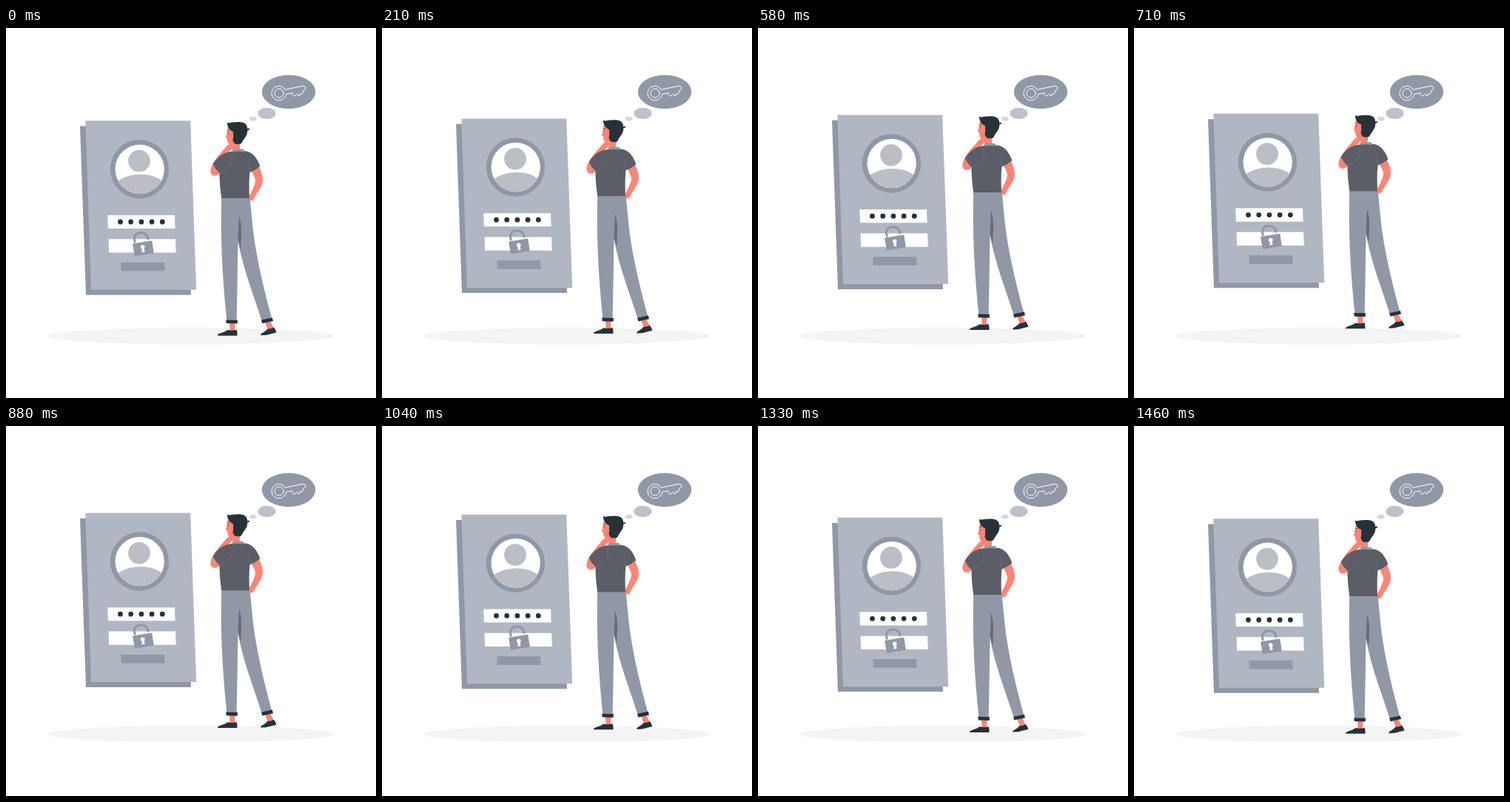
Recreate the animation shown at these times as an HTML page. Size 500 by 500 pixels, loop 1.5 s.

```html
<!DOCTYPE html>
<html lang="en">
<head>
<meta charset="utf-8">
<title>Forgotten password</title>
<style>
  html, body { margin: 0; width: 100%; height: 100%; overflow: hidden; background: #fff; }
  svg { display: block; width: 100%; height: 100%; }
  .mid { fill: #9098a6; }
  .light { fill: #b1b7c2; }
  .ink { fill: #263238; }
  .shirt { fill: #5b5e66; }
  .skin { fill: #ff8575; }
  .white { fill: #fff; }
  .line { fill: none; stroke: #fff; stroke-linejoin: round; }
</style>
</head>
<body>
<svg viewBox="0 0 500 500">
  <ellipse cx="249.7" cy="416.2" rx="193.7" ry="11.4" fill="#f4f4f4"/>

  <g id="bubble">
    <ellipse class="mid" cx="382" cy="86.3" rx="36.2" ry="22.9"/>
    <ellipse cx="352.5" cy="115.3" rx="12" ry="7.6" fill="#bcc1ca"/>
    <ellipse cx="333.7" cy="122.7" rx="5" ry="3" fill="#d6d9de"/>
    <g class="line">
      <circle cx="369" cy="88" r="6"/>
      <path d="M377.2 83.3L400.5 78.4Q404.6 78 405 81Q405 83.6 402 84.3L400.6 88.6Q399.4 90.4 397.8 88.2L395.8 92L393.6 89.4L391.6 90.2L389.6 92.6L387.2 90L386.8 87.6L378.4 89.4A9.7 9.7 0 1 1 377.2 83.3Z"/>
    </g>
  </g>

  <g id="floating">
    <g id="panel">
      <path class="mid" d="M100 132.6H242L250 360.7H108Z"/>
      <path class="light" d="M107.4 125.3H249.2L257.2 353.8H115Z"/>
      <circle class="mid" cx="180.5" cy="190.8" r="39.7"/>
      <circle class="white" cx="180.7" cy="190.8" r="33.2"/>
      <circle cx="180" cy="179.6" r="14.9" fill="#bbbfc5"/>
      <path d="M151.6 206.6C168 195 196 195 210.2 206.2A33.2 33.2 0 0 1 151.6 206.6Z" fill="#bbbfc5"/>
      <path class="white" d="M137.3 253H228L228.6 271.1H137.9ZM138.5 285.3H229.1L229.7 303.5H139.1Z"/>
      <path d="M154.5 262H212" fill="none" stroke="#263238" stroke-width="6.8" stroke-linecap="round" stroke-dasharray="0 14.2"/>
      <path class="mid" d="M155.2 316.7H214.2L214.6 328.5H155.6Z"/>
      <path d="M174.6 290C170.8 280.5 177 276.6 182 276.6C188 276.4 192.2 280.5 192 286" fill="none" stroke="#9098a6" stroke-width="3"/>
      <path class="mid" d="M172 291.3L196.2 287.4Q197.2 287.3 197.4 288.2L199.7 303.2Q199.8 304.2 198.8 304.4L175 308.3Q174 308.4 173.8 307.4L171.2 292.4Q171.1 291.5 172 291.3Z"/>
      <circle class="white" cx="184.7" cy="296" r="2.8"/>
      <path class="white" d="M184 296H186L187.6 302.4L183.4 303.2Z"/>
    </g>

    <g id="man">
      <path class="skin" d="M302 398H309.6L309 409H302.6ZM350 397L356.8 395.5L361.5 405L354 408Z"/>
      <path class="ink" d="M286 415.7C285.6 412.2 293.5 412.8 299.5 408Q305 409.6 311.6 407.8Q313 411.6 312.4 415.7ZM344.2 415.2C344 411.8 350.5 411.6 353.2 406.8Q358 406.8 361.8 404.6Q364.6 407.8 365.4 411.5L351.5 415Z"/>
      <path class="mid" d="M291.2 229H329.4C331.6 246 332.6 266 336.2 290C341.4 324 350.5 360 359 391.8L345.4 395C335.5 363 320 325 313.6 288C312.6 330 312.6 362 311.6 396H298.4C293 344 289.4 288 291.2 229Z"/>
      <path d="M315 254C319.6 268 318 284 317 299Q314.4 290 313.5 285Z" fill="#686d79"/>
      <path class="ink" d="M297.2 394.4L313 394.8L312.6 399.6L297.8 399.1ZM345 394.6L359.8 391.4L361 396L346.4 399.2Z"/>

      <path class="skin" d="M331 188L341.6 187C345 194 348 202 346.6 209C344.4 217 338.5 223 335.4 230.5Q333 233.8 329 233.4V227C332 220 336.6 212 337 207C336.6 201 333 196 331 192Z"/>
      <path class="skin" d="M276.4 194C276 184 290 169 297.5 160.5C301 156.5 306.5 156.5 306.4 161C305 164.5 301.5 166 299 170C294 177 289.5 183 288 188V197C283 201.5 277 200 276.4 194Z"/>
      <path class="shirt" d="M298 168.2Q310 165 323 166.2C334 167.4 340 177 343.4 187Q337 192.6 329.4 195.2C328.2 207 328.6 218 329 230H291.2C289.6 219 288.6 208 288.4 196Q282.8 191 279.6 183.8Q287 171.6 298 168.2Z"/>
      <path d="M288.4 196Q303 191.5 305.4 180Q306 175 304.6 171M329.4 195.2L328.2 180" fill="none" stroke="#747780" stroke-width=".6"/>
      <path class="skin" d="M299.6 134C298.6 139 298.8 143 296.8 148L299 149.4C299 155 300.6 158.4 305.6 157.6L306.2 165L315.4 165L317 154L312 134Z"/>
      <path class="mid" d="M305.8 164.2Q313 162.6 321.2 164L321.4 167.4Q313 166 305.6 167.4Z"/>
      <path class="skin" d="M295 164Q298 158.6 303 155.8Q307 156.6 306.2 160.5L299.5 168Z"/>
      <path class="ink" d="M299 127.4Q302 129 305 127.6C311 127 318 126.6 322 128.6Q326 131 326.2 136L329.6 135.4Q329 138 326.2 138.4C326.6 146 321 149 318 156Q314 158 309.6 156.4C306.6 154 305.8 150 306.8 146L307.2 140C302.4 138.6 298.6 133 299 127.4Z"/>
      <path class="skin" d="M307.4 144.5C303.8 143 303 149.4 306.8 150Z"/>
      <path d="M299.4 138.2L302 138.8M300.2 141.4V143" fill="none" stroke="#263238" stroke-width=".8"/>
    </g>
  </g>
</svg>
<script>
  const LOOP = 1500, STEPS = 36, RISE = 10;
  const floating = document.getElementById('floating');

  // Linear rise and fall, held at 24 steps a second.
  function draw(now) {
    const step = Math.floor(((now + 8) % LOOP) * STEPS / LOOP);
    const half = (STEPS - 1) / 2;
    const y = (Math.abs(step - half) - half) * RISE * 2 / STEPS;
    floating.setAttribute('transform', `translate(0 ${y.toFixed(3)})`);
  }

  let start;
  function tick(now) {
    start ??= now;
    draw(now - start);
    requestAnimationFrame(tick);
  }
  draw(0);
  requestAnimationFrame(tick);
</script>
</body>
</html>
```
